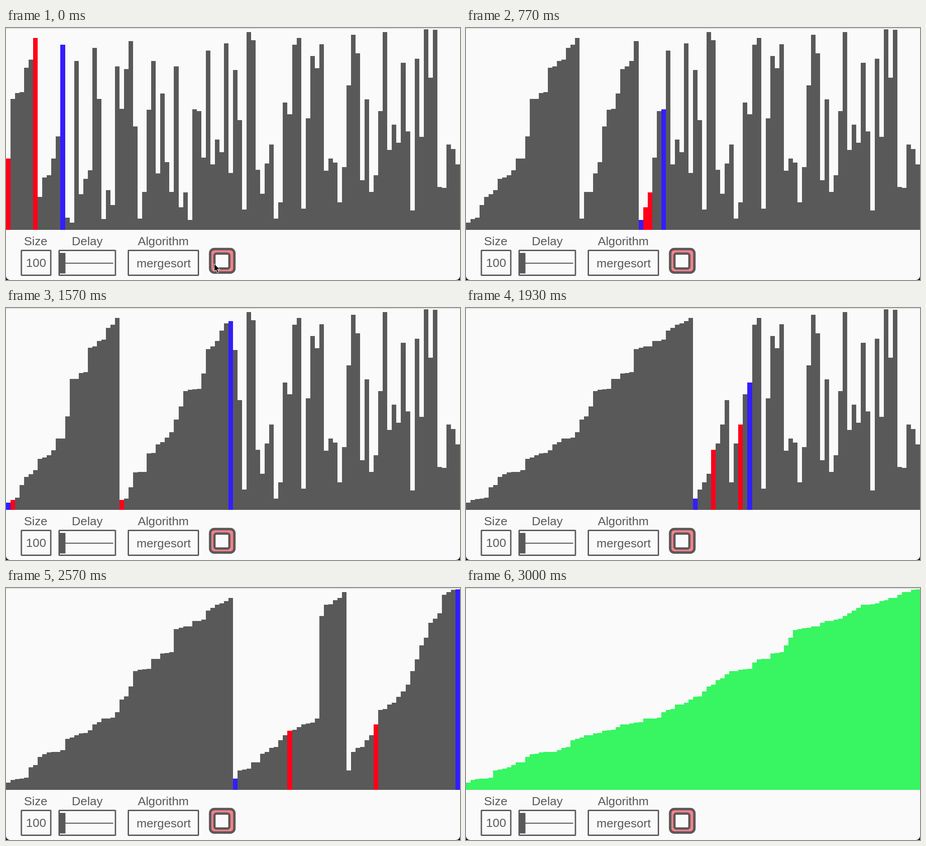
These frames come from a looping animation (1004 px wide and 558 px high, 3510 ms). An HTML page with a canvas:

```html
<!DOCTYPE html>
<html lang="en">
<head>
<meta charset="utf-8">
<title>Merge sort visualiser</title>
<style>
  html, body { margin: 0; width: 100%; height: 100%; overflow: hidden; background: #0c1f2e; }
  #app { position: relative; width: 1004px; height: 558px; overflow: hidden; background: #fafafa; border-radius: 0 0 9px 9px; }
  canvas, svg { position: absolute; left: 0; top: 0; display: block; }
  text { font: 26.67px "Liberation Sans", Arial, sans-serif; fill: #595959; text-anchor: middle; }
  .box { fill: none; stroke: #595959; stroke-width: 3; }
</style>
</head>
<body>
<div id="app">
  <canvas id="chart" width="1004" height="448"></canvas>
  <svg width="1004" height="558" viewBox="0 0 1004 558">
    <rect width="1004" height="1.5" fill="#d6d6d6"/>
    <text x="65.7" y="481">Size</text>
    <text x="179.7" y="481">Delay</text>
    <text x="347.7" y="481">Algorithm</text>

    <rect class="box" x="34" y="492.5" width="65" height="55" rx="1"/>
    <text x="66.5" y="528.5">100</text>

    <rect class="box" x="117.5" y="492.5" width="124.5" height="55" rx="1"/>
    <rect x="118" y="498" width="13.5" height="45.5" fill="#595959"/>
    <rect x="131" y="519.7" width="106" height="2.2" fill="#595959"/>

    <rect class="box" x="270.5" y="492.5" width="155" height="55" rx="1"/>
    <text x="348.7" y="530">mergesort</text>

    <g stroke="#595959">
      <rect x="451.5" y="489.5" width="53.5" height="52" rx="9" fill="#ff8088" stroke-width="5.5"/>
      <rect x="461" y="499.5" width="33" height="33" rx="4" fill="#fafafa" stroke-width="5"/>
    </g>

    <path id="cursor" d="M0 0V17L4 13.4L6.9 20L9.9 18.7L7 12.3H12Z" fill="#000" stroke="#fff" stroke-width="1"/>
  </svg>
</div>
<script>
const LOOP = 3510, LAST = 90, BASE = 447, BAR = 10.04;
const GREY = '#595959', RED = '#ff0019', BLUE = '#321eff', GREEN = '#38f562';

// Top edge of each bar; a smaller number is a taller bar.
const tops = [
  289, 157, 144, 142, 88, 70, 22, 374, 331, 326,
  289, 240, 37, 420, 431, 73, 368, 334, 315, 44,
  157, 423, 359, 392, 85, 179, 91, 29, 218, 422,
  363, 181, 73, 322, 145, 297, 363, 85, 397, 364,
  425, 180, 184, 287, 50, 302, 247, 275, 34, 321,
  93, 204, 402, 9, 27, 314, 367, 300, 258, 422,
  386, 165, 191, 37, 22, 400, 200, 62, 89, 36,
  316, 289, 298, 386, 308, 127, 15, 56, 337, 158,
  363, 326, 184, 9, 270, 214, 254, 77, 229, 404,
  68, 241, 3, 110, 4, 352, 354, 258, 268, 302
];

// Pace of the sort: [tick, steps done], linear in between.
const pace = [[0, 36], [14, 151], [32, 204], [47, 238], [65, 388], [77, 541], [80, 575], [90, 672]];

const steps = [];

function merge(lo, mid, hi) {
  const left = tops.slice(lo, mid + 1), right = tops.slice(mid + 1, hi + 1);
  let i = 0, j = 0;
  for (let k = lo; k <= hi; k++) {
    steps.push({ bars: tops.slice(), blue: [lo, hi], red: [lo + i, mid + j] });
    const takeLeft = j >= right.length || (i < left.length && left[i] >= right[j]);
    tops[k] = takeLeft ? left[i++] : right[j++];
  }
}

function sort(lo, hi) {
  if (lo >= hi) return;
  const mid = (lo + hi) >> 1;
  sort(lo, mid);
  sort(mid + 1, hi);
  merge(lo, mid, hi);
}

sort(0, tops.length - 1);
steps.push({ bars: tops.slice(), done: true });

function stepAt(tick) {
  const n = pace.findIndex(p => p[0] >= tick);
  if (n < 1) return pace[0][1];
  const [t0, s0] = pace[n - 1], [t1, s1] = pace[n];
  return Math.round(s0 + (s1 - s0) * (tick - t0) / (t1 - t0));
}

const ctx = document.getElementById('chart').getContext('2d');
const cursor = document.getElementById('cursor');

function barColor(step, i) {
  if (step.done) return GREEN;
  if (step.red.includes(i)) return RED;
  return step.blue.includes(i) ? BLUE : GREY;
}

function draw(tick) {
  const step = steps[stepAt(tick)];
  ctx.clearRect(0, 0, 1004, 448);
  step.bars.forEach((top, i) => {
    const x = Math.round(i * BAR), end = Math.round((i + 1) * BAR);
    ctx.fillStyle = barColor(step, i);
    ctx.fillRect(x, top, end - x, BASE - top);
  });
  // The pointer leaves through the bottom edge.
  const out = Math.min(tick / 6, 1);
  cursor.setAttribute('transform', `translate(460.5 ${522 + 40 * out * out})`);
}

let shown = -1;
const start = performance.now();

function loop(now) {
  const t = Math.max(0, now - start) % LOOP;
  const tick = Math.min(LAST, Math.floor((Math.floor(t / 10) * 10 + 5) * 0.03));
  if (tick !== shown) draw(shown = tick);
  requestAnimationFrame(loop);
}

draw(0);
requestAnimationFrame(loop);
</script>
</body>
</html>
```
